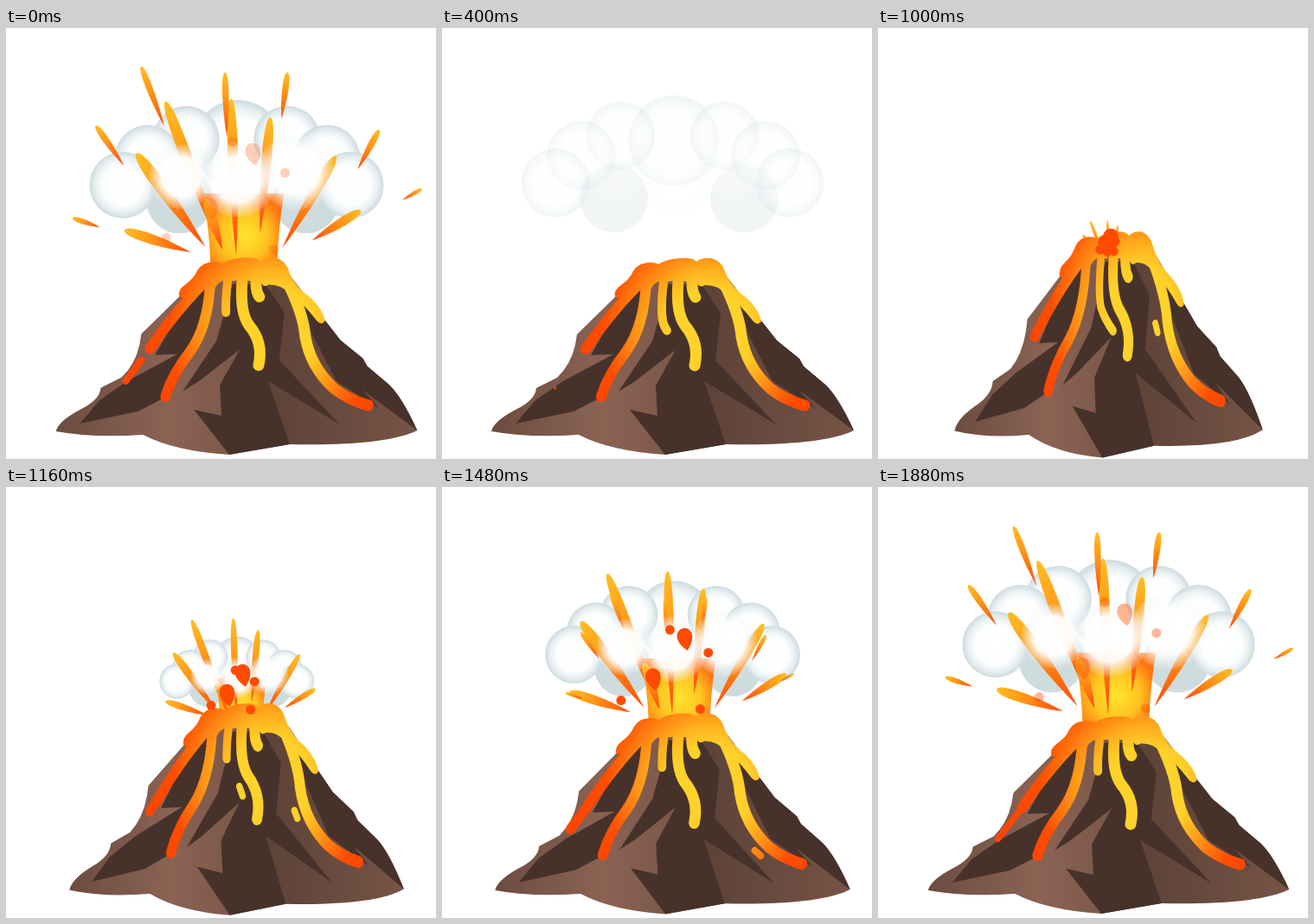
An HTML page with a canvas for the animation above (1.92 s loop, 497 by 498 pixels).

```html
<!DOCTYPE html>
<html>
<head>
<meta charset="utf-8">
<title>Volcano</title>
<style>
html, body { margin: 0; width: 497px; height: 498px; overflow: hidden; background: #fff; }
canvas { display: block; }
</style>
</head>
<body>
<canvas id="stage" width="497" height="498"></canvas>
<script>
const c = document.getElementById('stage').getContext('2d');
const LOOP = 1920, STEP = 40, VENT = [267, 272];
const clamp = v => Math.max(0, Math.min(1, v));
const ramp = (t, a, b) => clamp((t - a) / (b - a));
const settle = (t, start, tau) => t < start ? 0 : 1 - Math.exp((start - t) / tau);

// Linear interpolation through [time, value] pairs.
function track(t, keys) {
  let i = 1;
  while (i < keys.length - 1 && t > keys[i][0]) i++;
  const [a, x] = keys[i - 1], [b, y] = keys[i];
  return x + (y - x) * ramp(t, a, b);
}

function stops(g, list) {
  for (const [at, color] of list) g.addColorStop(at, color);
  return g;
}

const rock = stops(c.createLinearGradient(60, 0, 475, 0),
  [[0, '#6d4d41'], [.3, '#8a6353'], [.5, '#7c5849'], [.6, '#5e4338'], [1, '#765446']]);
const lava = stops(c.createRadialGradient(310, 350, 0, 310, 350, 150),
  [[0, '#ffd62c'], [.33, '#ffd02a'], [.47, '#ffb01e'], [.64, '#ff7f12'], [.82, '#ff4d00'], [1, '#ff4600']]);
const fire = stops(c.createRadialGradient(278, 240, 4, 272, 240, 52),
  [[0, '#ffe02c'], [.5, '#ffc320'], [1, '#ff7410']]);

const silhouette = 'M57 466Q60 454 85 441Q108 430 109 416L133 404Q149 389 154 366L156 354L203 308L235 282L300 272L328 286L372 342L387 361L413 382L418 391L443 412Q458 426 476 465Q440 483 328 481L258 493Q195 489 158 470Q100 474 57 466Z';
const shade = [
  'M262 296L300 296L322 330L316 384L386 458L303 408L328 481L258 493L217 441L249 448L247 413L270 372L222 409L204 420L243 362Z',
  'M228 300L188 350L172 378L198 377L140 408L108 430L85 457L152 443L184 427L220 350L236 310Z',
  'M328 290L372 342L387 361L413 382L418 391L443 412Q458 426 476 465L412 418L432 440L382 408L352 350Z'
].map(d => new Path2D(d));
const cap = 'M200 311Q198 303 207 297Q217 290 221 281Q227 271 240 271Q248 271 250 273Q262 266 276 266Q290 265 294 270Q300 265 311 266Q324 269 328 284Q335 300 352 312Q367 326 369 339Q365 345 359 338Q342 316 328 308Q320 297 304 297Q298 301 295 295Q270 290 263 293Q245 289 240 305Q229 303 225 303Q217 303 212 306Q205 314 200 311Z';
const drips = [
  [12, 'M233 291Q200 322 166 371'],
  [12, 'M236 292Q234 345 212 375Q192 400 184 426'],
  [13, 'M324 291Q344 330 346 356Q352 392 380 417Q397 430 419 436'],
  [13, 'M273 293Q270 329 281 344Q298 364 292 390'],
  [13, 'M289 294Q289 306 293 311'],
  [8, 'M228 290L205 307']
].map(([w, d]) => [w, new Path2D(d)]);
const body = new Path2D(silhouette), crust = new Path2D(cap);
const shortDrip = new Path2D('M256 293Q252 328 256 342Q261 354 273 366L278 374');
const column = new Path2D('M227 190L322 190Q315 235 314 276L236 276Q235 235 227 190Z');

const backPuffs = [
  [198, 196, 40, 1], [350, 196, 40, 1], [268, 129, 53], [206, 123, 40], [327, 123, 40],
  [160, 146, 40], [375, 146, 40], [130, 178, 40], [403, 178, 40]
];
const frontPuffs = [[200, 168, 39], [338, 162, 46], [268, 171, 46]];

// Outer tip, inner tip, half width.
const jets = [
  [183, 82, 246, 250, 9], [260, 79, 266, 263, 8], [306, 101, 294, 236, 8],
  [149, 143, 230, 253, 10], [383, 146, 320, 254, 8], [135, 233, 213, 259, 8],
  [412, 210, 355, 245, 7], [230, 196, 250, 256, 8]
];
const sparks = [
  [155, 42, 182, 112, 5], [253, 49, 255, 124, 5], [326, 49, 319, 103, 5],
  [102, 111, 135, 158, 5], [433, 116, 408, 162, 5], [75, 219, 107, 230, 4], [483, 185, 460, 198, 3]
];
// Offset from the vent, radius.
const blobs = [[19, -116, 9], [-32, -51, 9], [-5, -130, 5], [57, -93, 5], [-84, -16, 5], [44, -2, 5]];

function zoomed(scale, draw) {
  if (scale <= 0) return;
  c.save();
  c.translate(...VENT);
  c.scale(scale, scale);
  c.translate(-VENT[0], -VENT[1]);
  draw();
  c.restore();
}

function puff([x, y, r, flat], front) {
  const g = c.createRadialGradient(x, y, 0, x, y, r);
  c.fillStyle = flat ? '#cfdcdd' : stops(g, front
    ? [[0, '#fff'], [.6, 'rgba(255,255,255,.95)'], [1, 'rgba(240,246,247,.12)']]
    : [[0, '#fff'], [.6, '#fdfefe'], [.82, '#e9f0f2'], [1, '#cddbdf']]);
  c.beginPath();
  c.arc(x, y, r, 0, 7);
  c.fill();
}

function streak([x, y, x2, y2, w]) {
  const len = Math.hypot(x2 - x, y2 - y);
  c.save();
  c.translate(x, y);
  c.rotate(Math.atan2(y2 - y, x2 - x));
  c.fillStyle = stops(c.createLinearGradient(0, 0, len, 0), [[0, '#ffbe22'], [.4, '#ff9618'], [1, '#ff4a08']]);
  c.beginPath();
  c.moveTo(0, 0);
  c.bezierCurveTo(0, -w, len * .5, -w, len, 0);
  c.bezierCurveTo(len * .5, w, 0, w, 0, 0);
  c.fill();
  c.restore();
}

function line(x, y, x2, y2, w) {
  c.lineWidth = w;
  c.beginPath();
  c.moveTo(x, y);
  c.lineTo(x2, y2);
  c.stroke();
}

function stretch(t) {
  if (t < 400) t += LOOP;
  if (t >= 1000) return -.15 * Math.exp((1000 - t) / 242);
  if (t < 760) return .1 * (1 - (1 - ramp(t, 400, 680)) ** 2);
  const p = ramp(t, 760, 1000);
  return .1 - .25 * p * p * (3 - 2 * p);
}

function eruption(u) {
  const cloud = settle(u, 953, 293);
  const cloudAlpha = 1 - ramp(u, 1930, 2470);
  const fireAlpha = 1 - ramp(u, 1920, 2200);
  const power = settle(u, 930, 235);
  c.globalAlpha = cloudAlpha;
  zoomed(cloud, () => backPuffs.forEach(p => puff(p)));
  c.globalAlpha = fireAlpha;
  zoomed(power, () => {
    c.fillStyle = fire;
    c.fill(column);
    jets.forEach(streak);
  });
  zoomed(settle(u, 1350, 125), () => sparks.forEach(streak));
  c.globalAlpha = cloudAlpha;
  zoomed(cloud, () => frontPuffs.forEach(p => puff(p, true)));
  c.globalAlpha = 1;
}

function runnerAt(t) {
  return [
    track(t, [[560, 314], [760, 321], [1000, 333], [1320, 352], [1640, 389]]),
    track(t, [[560, 300], [760, 332], [1000, 367], [1320, 411], [1640, 443]])
  ];
}

function mountain(t) {
  const k = stretch(t);
  c.save();
  c.translate(267, 470);
  c.scale(1 + k, 1 - k);
  c.translate(-267, -470);
  c.fillStyle = rock;
  c.fill(body);
  c.fillStyle = '#46322b';
  shade.forEach(s => c.fill(s));
  c.fillStyle = c.strokeStyle = lava;
  c.lineCap = 'round';
  for (const [w, path] of drips) {
    c.lineWidth = w;
    c.stroke(path);
  }
  c.fill(crust);

  c.lineWidth = 10;
  c.setLineDash([track(t, [[0, 36], [400, 58], [760, 68], [1000, 78], [1160, 32], [1920, 36]]), 999]);
  c.stroke(shortDrip);
  c.setLineDash([]);
  if (t > 1080 && t < 1480) line(270, 355, 274, 365, 8 * (1 - ramp(t, 1280, 1480)) + .1);

  // Left trickle grows, then breaks away and shrinks.
  const flow = ramp(t, 1000, 1720) ** .8;
  if (t > 1000) line(166, 371, 166 - 28 * flow, 371 + 36 * flow, 11 - 4 * ramp(t, 1640, 1880));
  else if (t < 440) {
    const p = ramp(t, 0, 420);
    line(156 - 26 * p, 384 + 33 * p, 138 - 8 * p, 408 + 9 * p, 8 - 6 * p);
  }
  if (t > 600 && t < 1740) line(...runnerAt(t), ...runnerAt(t - 60), 8 * (1 - ramp(t, 1640, 1740)));
  c.restore();
}

function ejecta(u) {
  if (u < 960) return;
  const reach = 1 - (1 - ramp(u, 925, 2115)) ** 2;
  c.globalAlpha = 1 - ramp(u, 1720, 1990);
  c.fillStyle = '#ff4b00';
  for (const [dx, dy, r] of blobs) {
    const x = 267 + dx * reach, y = 258 + dy * reach;
    c.beginPath();
    if (r > 5) {
      c.moveTo(x + 3, y + 14);
      c.bezierCurveTo(x - 16, y + 1, x - 9, y - 12, x, y - 12);
      c.bezierCurveTo(x + 11, y - 11, x + 11, y + 3, x + 3, y + 14);
    } else c.arc(x, y, r + .5, 0, 7);
    c.fill();
  }
  c.globalAlpha = 1;
}

function frame() {
  const t = Math.floor(performance.now() % LOOP / STEP) * STEP;
  const u = t < 700 ? t + LOOP : t;
  c.clearRect(0, 0, 497, 498);
  eruption(u);
  mountain(t);
  ejecta(u);
  requestAnimationFrame(frame);
}
frame();
</script>
</body>
</html>
```
